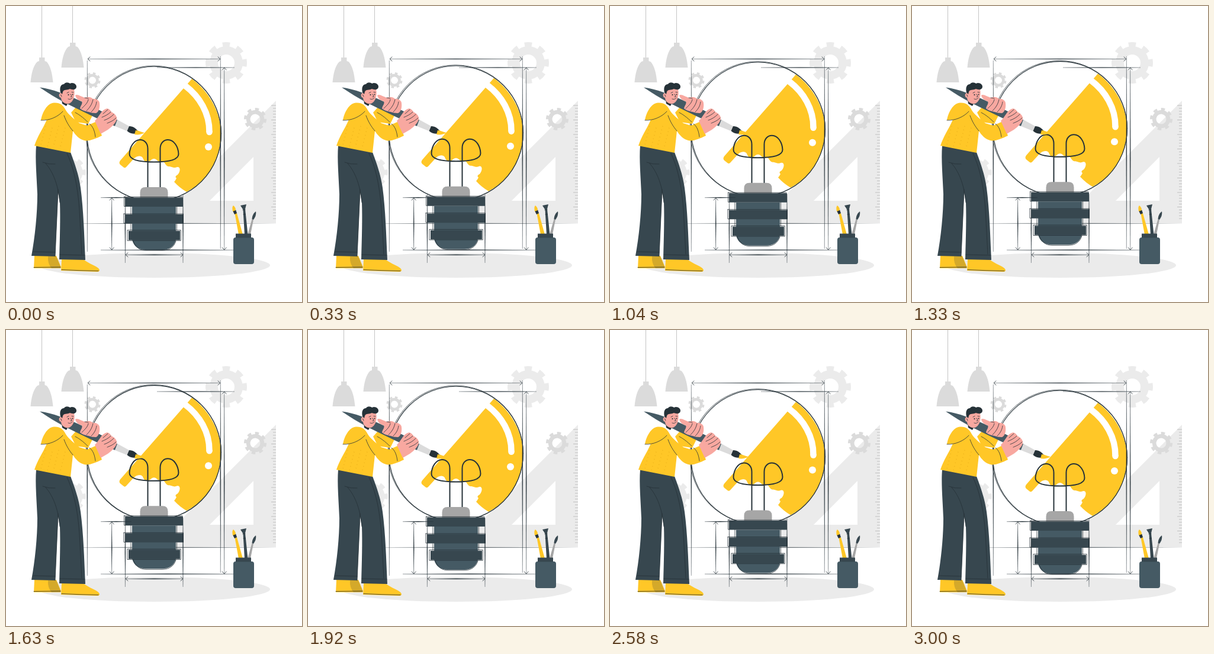
An HTML page for the animation above (3040 ms loop, 500 by 500 pixels).

```html
<!DOCTYPE html>
<html lang="en">
<head>
<meta charset="utf-8">
<title>Painting an idea</title>
<style>
html, body { margin: 0; width: 100%; height: 100%; overflow: hidden; background: #fff; }
svg { display: block; width: 100%; height: 100%; }
.ink { fill: none; stroke: #263238; stroke-width: .8; stroke-linecap: round; stroke-linejoin: round; }
.pale { fill: #ebebeb; }
.grey { fill: #dbdbdb; }
.yellow { fill: #ffc727; }
.skin { fill: #f8a8a0; }
.dark { fill: #37474f; }
.slate { fill: #455a64; }
.black { fill: #263238; }
</style>
</head>
<body>
<svg viewBox="0 0 500 500">
  <defs>
    <g id="lamp">
      <path d="M60.5 0V88" stroke="#c4c4c4"/>
      <path class="grey" d="M56 87h9.500v6l3 1C75 101 78 113 79.500 129H41.500C43 113 46 101 53 94l3-1Z"/>
    </g>
  </defs>

  <ellipse class="pale" cx="250" cy="438" rx="196" ry="21"/>
  <use href="#lamp"/>
  <use href="#lamp" x="52" y="-25"/>
  <path class="pale" fill-rule="evenodd" d="M456 160V367H249ZM418 255 344 329H418Z"/>
  <g id="gears" fill="none"></g>
  <path id="ticks" stroke="#b5b5b5" stroke-width=".8"/>
  <path class="black" d="M86 367.200 270 366.700 460 367.200 270 367.800Z"/>

  <g id="bulb">
    <circle cx="249.500" cy="215.500" r="113.500" fill="#fff"/>
    <path class="yellow" d="M314 123 193 261Q190 265 193 268L198 272Q201 275 204 271L214 260Q221 252 228 254C233 256 231 262 237 263C244 264 245 258 250 258C255 258 255 264 264 263C269 263 269 270 274 271C281 271 283 275 289 272C295 271 295 279 290 285Q284 288 288 291Q286 295 284 297Q293 307 305 314C342 296 363 256 363 215C363 178 342 144 314 123Z"/>
    <path d="M302.500 134.500C327 153 344 181 343.500 213" fill="none" stroke="#fff" stroke-width="10.500"/>
    <circle cx="343.500" cy="213" r="5.200" fill="#fff"/>
    <circle cx="342" cy="238" r="6" fill="#fff"/>
    <g class="ink">
      <circle cx="249.300" cy="215.300" r="114.300"/>
      <ellipse cx="250.200" cy="216" rx="113.300" ry="113.700" stroke-width="1.100"/>
      <path stroke-width="2" d="M239.500 306V241C239.500 231 233 226 226.500 226C216 226 209 238 208.500 250C208.500 261 229 263.500 250 263.500C271 263.500 291.500 261 291.500 250C291 238 284 226 273.500 226C267 226 260.500 231 260.500 241V306"/>
    </g>
    <path fill="#a6a6a6" d="M226.500 324V315Q226.500 306 235.500 306H264.500Q273.500 306 273.500 315V324Z"/>
    <path class="slate" d="M213 339H287V395C284 407 275 412 264 412H236C225 412 216 407 213 395Z"/>
    <path class="dark" d="M201 323.500h98V339H201ZM201 352h99v15.500h-99ZM207 380h87v15.500h-87Z"/>
    <path class="ink" stroke-width=".7" d="M199.500 322.500H298M199.500 322V338.500H201M199 351H299.500V367M199 351V367H201M205.300 378.700H295.300V396.300H205.300ZM211 339V352M288.500 339V352M211 368V379M288.500 368V379M215 397C219 408 226 413 237 413H264C276 413 284 407 287 397"/>
  </g>

  <g id="lines" class="black"></g>
  <path id="arrows" class="ink" stroke-width="1.100"/>

  <g id="cup">
    <path class="yellow" d="M386.500 351 390 350 400 386H393Z"/>
    <path class="black" d="M383 346 388 344 390 350 386 352Z"/>
    <path class="yellow" d="M384 337C387 339 388 342 388 345L383 347C382 342 382 339 384 337Z"/>
    <path class="dark" d="M396 337Q401 336 406 335L404 343 408.500 386H403L400.500 344Z"/>
    <path class="ink" stroke="#fff" stroke-width=".6" d="M400 344.500 404 344M401 352 404.500 351.500"/>
    <path fill="#a6a6a6" d="M415.500 360 418 361 413 386H408Z"/>
    <path class="dark" d="M422 347C423 352 421 357 418 361L415.500 360C416 354 418 350 422 347Z"/>
    <rect class="slate" x="384" y="391" width="35" height="45" rx="4"/>
    <rect class="dark" x="388" y="384.500" width="26" height="7"/>
  </g>

  <g id="man">
    <path class="yellow" d="M48 422H85L93 441 92 443H47Z"/>
    <path fill="#263238" opacity=".2" d="M71 423H85L93 443H77Q70 435 71 423Z"/>
    <path class="yellow" d="M94 428H131C140 436 157 440 158 446Q158 449 154 449L93 447Z"/>
    <path class="ink" d="M47 441.500 92 441M94 445.500Q125 447 156 447.500"/>
    <path class="dark" d="M51 236 109 247C116 266 123 285 126 307C131 345 132 385 134 429L90 428C91 390 92 360 91 332L88 315 83 423 43 422C49 390 53 350 53 318C52 290 49 258 51 236Z"/>
    <path class="ink" d="M62 264Q72 268 83 267M67 266C77 277 88 298 91 332M88 310 83 423M46 415 83 416M91 420 133 421M103 249C113 270 121 300 124 345L128 419"/>

    <path class="yellow" d="M110 180 118 171 147 183 139 199 118 196Z"/>
    <path class="yellow" d="M69 192 59 193C61 181 68 167 78 164C89 162 96 166 101 176C106 184 114 190 124 198L137 202 153 195 162 219C150 225 139 229 132 227C124 225 117 218 113 211L109 248 48 236C53 220 62 208 69 192Z"/>
    <path class="ink" d="M59 193C73 194 88 187 96 178M98 185C102 196 107 204 113 211M141 199C147 203 150 212 151 221M117 180C123 183 130 188 138 196"/>
    <path id="weave" fill="none" stroke="#e8ac18" stroke-width=".8"/>

    <path class="slate" d="M57 137.500C78 140 103 150 125 160L160 177 189 193 184 203 150 188 117 172C94 161 75 150 57 137.500Z"/>
    <path class="grey" d="M188 192 208 203 204 211 184 203Z"/>
    <path class="black" d="M208 203C215 203 220 207 224 213C221 217 211 217 204.500 211Z"/>
    <path class="yellow" d="M219 210C224 210 228 213 234 214C229 217 223 218 217 217Z"/>

    <path class="black" d="M94 158 105 163 102 169 95 165Z"/>
    <path class="skin" d="M94 140H115C116 146 116 151 114 157C111 163 107 166 102 165C96 164 93 159 93 155C89 155 88 147 93 147Z"/>
    <path class="black" d="M92 146C90 137 93 132 98 132C100 128 106 129 108 131C113 128 119 132 119 136C119 142 112 142 108 140C103 143 98 140 96 145L95 149Z"/>
    <path class="ink" d="M103 147 106 145.500M111 145.500 114 146M109 149 111.500 153 109 153.500M105 157Q109 159 112 155M92 150Q94 150 94 153"/>
    <circle class="black" cx="105.500" cy="150" r="1.100"/>
    <circle class="black" cx="112.500" cy="149.500" r="1"/>

    <path class="skin" d="M117 151C120 148 127 153 133 155C138 153 143 153 147 157C152 156 158 160 158 164C159 171 157 179 152 181C147 181 143 180 140 179C134 178 128 176 125 173C126 168 130 165 128 161C123 160 118 156 117 151Z"/>
    <path class="ink" d="M139 158C138 164 133 168 128 173M147 158C145 167 141 172 136 177M153 162C152 170 148 175 144 179M133 155 139 156"/>
    <path class="skin" d="M150 194C157 188 160 177 168 174C172 172 176 175 178 179C183 181 188 186 187 191C186 197 179 204 172 209L160 216Z"/>
    <path class="ink" d="M177 179C173 183 167 186 162 188M182 183C177 188 172 191 166 193M186 189C180 195 175 196 171 198M172 175 164 182"/>
  </g>
</svg>
<script>
const $ = id => document.getElementById(id);
const LOOP = 3040, LIFT = 8.9, LEAD = 50;

// Ring plus a dashed circle for the eight teeth
function gear(x, y, size, hole, color, turn) {
  const rim = size * .8, mid = (rim + hole) / 2, tooth = size * .88;
  return `<g transform="translate(${x} ${y}) rotate(${turn})" stroke="${color}">
    <circle r="${mid}" stroke-width="${rim - hole}"/>
    <circle r="${tooth}" stroke-width="${size * .24}" pathLength="16" stroke-dasharray="1 1" stroke-dashoffset=".5"/></g>`;
}
$('gears').innerHTML =
  gear(372, 96, 35, 14, '#ebebeb', 0) +
  gear(108, 281, 27, 12, '#ebebeb', 0) +
  gear(146, 125.5, 13.5, 6, '#dbdbdb', 15) +
  gear(421, 191, 19, 8.5, '#dbdbdb', 10);

let ticks = '';
for (let i = 0; i < 40; i++) ticks += `M456 ${168 + i * 4.9}h${i % 5 ? -5 : -8}`;
$('ticks').setAttribute('d', ticks);

let weave = '';
for (let i = 0; i < 24; i++) weave += `M${66 + i % 4 * 11 - (i >> 2) * 1.5} ${203 + (i >> 2) * 6 + i % 2 * 3}l1.500 .6`;
$('weave').setAttribute('d', weave);

// Pen stroke that thins out at both ends
function taper(x1, y1, x2, y2) {
  const mx = (x1 + x2) / 2, my = (y1 + y2) / 2;
  const dx = x1 === x2 ? .6 : 0, dy = .6 - dx;
  return `<path d="M${x1} ${y1}L${mx - dx} ${my - dy} ${x2} ${y2} ${mx + dx} ${my + dy}Z" stroke="#263238" stroke-width=".25"/>`;
}
const sizes = [[138, 89.5, 362, 89.5], [368.7, 104, 368.7, 412], [178.7, 324, 178.7, 412], [202, 420.3, 299, 420.3]];
const guides = [[137.3, 92, 137.3, 415], [362.3, 85, 362.3, 410], [255, 104, 386, 104], [160, 412.2, 386, 412.2],
  [160, 323.7, 212, 323.7], [201.4, 318, 201.4, 434], [299, 318, 299, 434]];
$('lines').innerHTML = [...sizes, ...guides].map(line => taper(...line)).join('');
$('arrows').setAttribute('d', sizes.map(([x1, y1, x2, y2]) => x1 === x2
  ? `M${x1 - 3.5} ${y1 + 4}l3.500-4 3.500 4M${x2 - 3.5} ${y2 - 4}l3.500 4 3.500-4`
  : `M${x1 + 4} ${y1 - 3.5}l-4 3.500 4 3.500M${x2 - 4} ${y2 - 3.5}l4 3.500-4 3.500`).join(''));

const start = performance.now();
function draw() {
  const t = (performance.now() - start + LEAD) % LOOP / LOOP;
  const y = -LIFT * (1 - Math.cos(t * 2 * Math.PI)) / 2;
  $('bulb').setAttribute('transform', `translate(0 ${y.toFixed(2)})`);
  requestAnimationFrame(draw);
}
draw();
</script>
</body>
</html>
```
